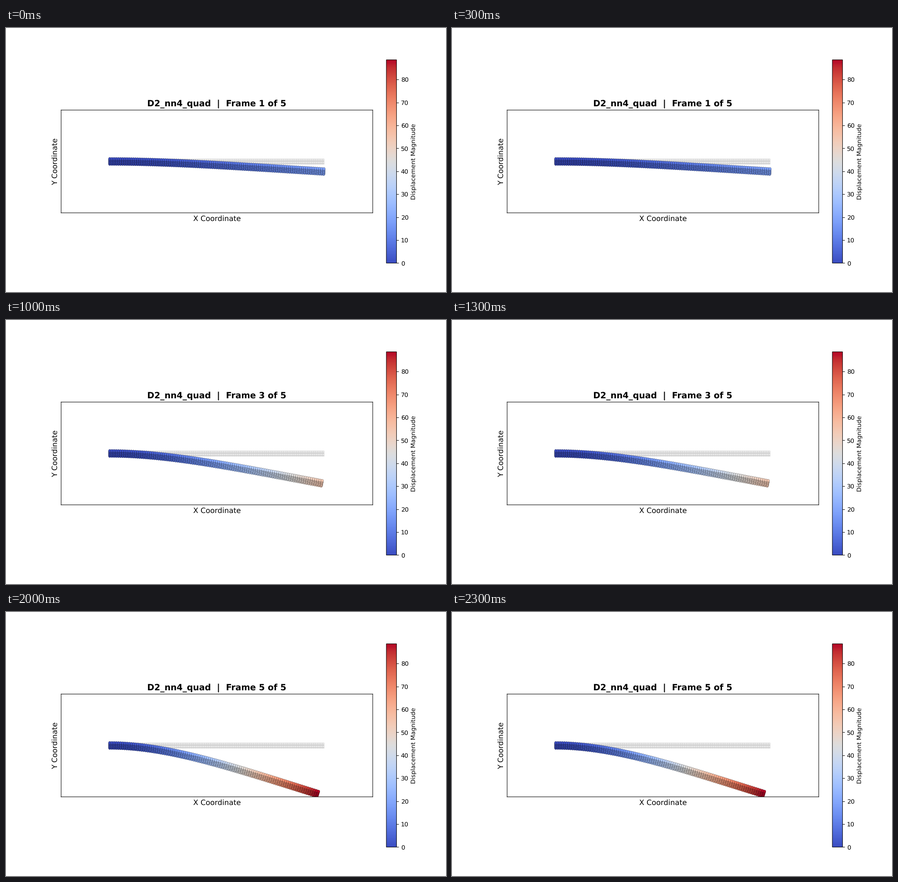
These frames come from a looping animation (966x580 px, 2500 ms). A matplotlib script:

```python
import numpy as np
import matplotlib.pyplot as plt
from matplotlib.animation import FuncAnimation
from matplotlib.collections import PolyCollection

STEPS = 5
LENGTH, HEIGHT = 390.0, 10.0
COLS, ROWS = 101, 11
MAX_DISP = 88.6
LOAD = 0.378  # non-dimensional load added per step
DPI = 96.6

plt.rcParams["font.family"] = "DejaVu Sans"
plt.rcParams["text.hinting"] = "none"


def running_integral(values, step):
    mids = (values[1:] + values[:-1]) / 2 * step
    return np.concatenate([[0.0], np.cumsum(mids)])


def centre_line(load):
    """Cantilever with a uniform dead load and large rotations."""
    s = np.linspace(0, 1, COLS)
    step = s[1] - s[0]
    angle = np.zeros(COLS)
    for _ in range(30):
        shear = running_integral(load * (1 - s) * np.cos(angle), step)
        angle = running_integral(shear[-1] - shear, step)
    x = LENGTH * running_integral(np.cos(angle), step)
    y = -LENGTH * running_integral(np.sin(angle), step)
    return x, y, angle


def deformed(step):
    x, y, angle = centre_line(LOAD * step)
    px = x + offset * np.sin(angle)
    py = y + offset * np.cos(angle) + HEIGHT / 2
    return np.column_stack([px.ravel(), py.ravel()])


def quads(points):
    grid = points.reshape(ROWS, COLS, 2)
    corners = [grid[:-1, :-1], grid[:-1, 1:], grid[1:, 1:], grid[1:, :-1]]
    return np.stack(corners, axis=2).reshape(-1, 4, 2)


offset = np.linspace(-HEIGHT / 2, HEIGHT / 2, ROWS)[:, None]
nodes = deformed(0)

fig, ax = plt.subplots(figsize=(966.001 / DPI, 580.001 / DPI), dpi=DPI)
fig.subplots_adjust(left=0.1253, right=0.9001, bottom=0.1095, top=0.8795)
ax.add_collection(PolyCollection(quads(nodes), facecolors="none",
                                 edgecolors="lightgray", linewidths=0.5))
beam = ax.scatter(*nodes.T, c=np.zeros(len(nodes)), s=20, cmap="coolwarm",
                  vmin=0, vmax=MAX_DISP, edgecolors="black", linewidths=0.2,
                  zorder=2)
bar = fig.colorbar(beam, ax=ax, fraction=0.046, pad=0.04)
bar.set_label("Displacement Magnitude")

ax.set_xlim(-MAX_DISP, LENGTH + MAX_DISP)
ax.set_ylim(-MAX_DISP, HEIGHT + MAX_DISP)
ax.set_aspect("equal")
ax.set_xticks([])
ax.set_yticks([])
ax.set_xlabel("X Coordinate", fontsize=12)
ax.set_ylabel("Y Coordinate", fontsize=12)
title = ax.set_title("", fontsize=14, fontweight="bold")

# Keep the frame lines on their fractional pixel positions.
for line in [*ax.spines.values(), bar.outline, *bar.ax.get_yticklines()]:
    line.set_snap(False)


def update(i):
    points = deformed(i + 1)
    beam.set_offsets(points)
    beam.set_array(np.hypot(*(points - nodes).T))
    title.set_text(f"D2_nn4_quad  |  Frame {i + 1} of {STEPS}")
    return beam, title


anim = FuncAnimation(fig, update, frames=STEPS, interval=500,
                     init_func=lambda: update(0), repeat=True, blit=False)
plt.show()
```
